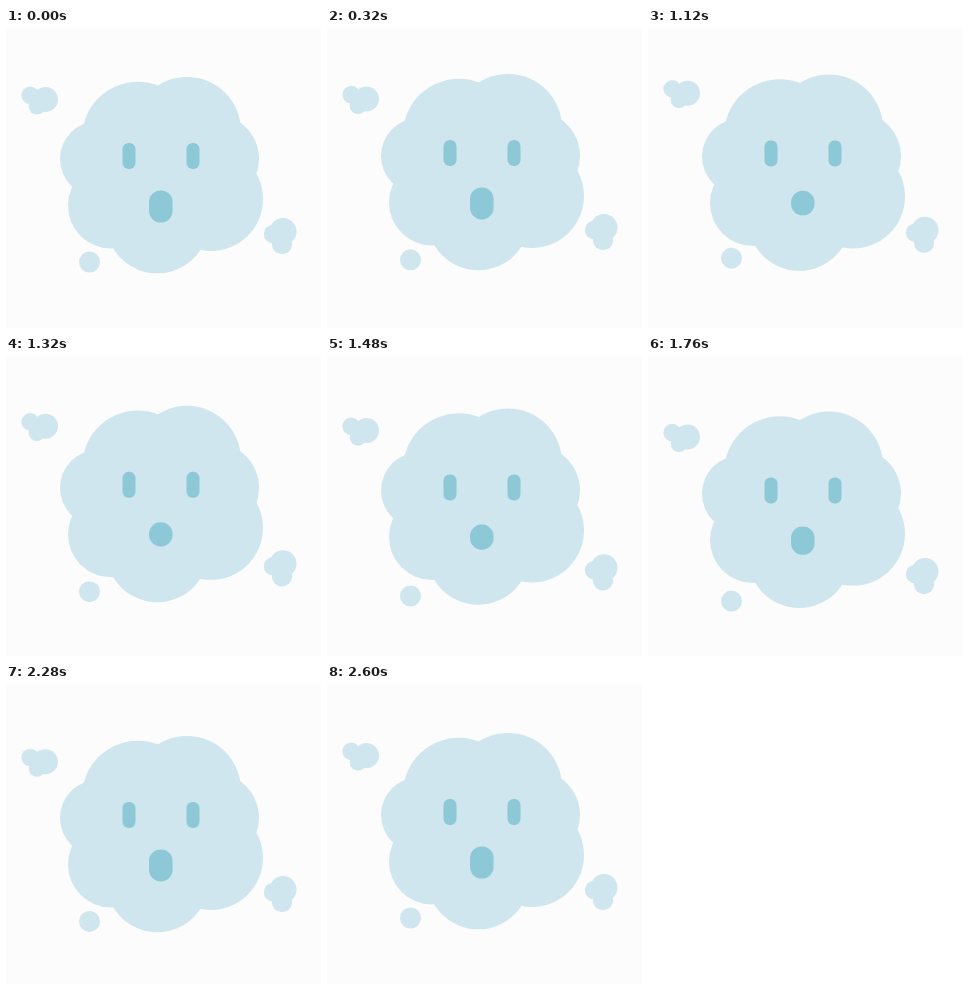
An HTML page with a canvas for the animation above (2640 ms loop, 315 by 300 pixels).

```html
<!DOCTYPE html>
<html lang="en">
<head>
<meta charset="utf-8">
<title>Floating cloud</title>
<style>
  html, body { margin: 0; width: 100%; height: 100%; overflow: hidden; background: #fcfcfc; }
  canvas { display: block; }
</style>
</head>
<body>
<canvas id="stage" width="315" height="300"></canvas>
<script>
const LOOP = 2640;
const CLOUD_COLOR = '#cfe6ef';
const FACE_COLOR = '#8dc8d7';
const ctx = document.getElementById('stage').getContext('2d');

const ease = p => {
  p = Math.min(1, Math.max(0, p));
  return p * p * (3 - 2 * p);
};

// Rise by `up`, sink to `down` below rest, then return, between start and end.
function bob(t, start, end, up, down) {
  const p = (t - start) / (end - start);
  return -up * ease(p / 0.24)
    + (up + down) * ease((p - 0.24) / 0.48)
    - down * ease((p - 0.72) / 0.28);
}

function puff(x, y, r) {
  ctx.beginPath();
  ctx.arc(x, y, r, 0, Math.PI * 2);
  ctx.fill();
}

function pill(cx, cy, w, h, r) {
  ctx.beginPath();
  ctx.roundRect(cx - w / 2, cy - h / 2, w, h, r);
  ctx.fill();
}

function floating(dy, draw) {
  ctx.save();
  ctx.translate(0, dy);
  draw();
  ctx.restore();
}

function drawCloud() {
  puff(132, 109.7, 56);
  puff(181, 103, 54);
  puff(208, 131, 45);
  puff(205, 171, 52);
  puff(151.3, 194, 51.3);
  puff(105, 177.5, 43);
  puff(92, 131, 38);
}

function drawLeftWisp() {
  puff(24.2, 67.2, 8.8);
  puff(39.5, 71.5, 12.5);
  puff(31, 78.3, 8.3);
}

function drawRightWisp() {
  puff(277, 203.5, 13.5);
  puff(267, 206, 9.2);
  puff(276, 216, 10.2);
}

function drawFace(t) {
  const squeeze = ease(1 - Math.abs(t - 1260) / 940);
  ctx.fillStyle = FACE_COLOR;
  for (const x of [123, 187]) pill(x, 128, 13, 26, 6);
  pill(154.8, 178.5 - squeeze, 23.5, 32 - 8 * squeeze, 11.5);
}

function render(t) {
  ctx.fillStyle = '#fcfcfc';
  ctx.fillRect(0, 0, 315, 300);
  ctx.fillStyle = CLOUD_COLOR;
  floating(bob(t, 240, 2640, 10, 11.3), drawLeftWisp);
  floating(bob(t, 60, 2460, 9.5, 12), drawRightWisp);
  floating(bob(t, 150, 2520, 10, 11.5), () => puff(83.5, 234, 10.5));
  floating(bob(t, 40, 2600, 7, 7), () => {
    drawCloud();
    drawFace(t);
  });
}

let start;
function tick(now) {
  start ??= now;
  render((now - start) % LOOP);
  requestAnimationFrame(tick);
}
render(0);
requestAnimationFrame(tick);
</script>
</body>
</html>
```
